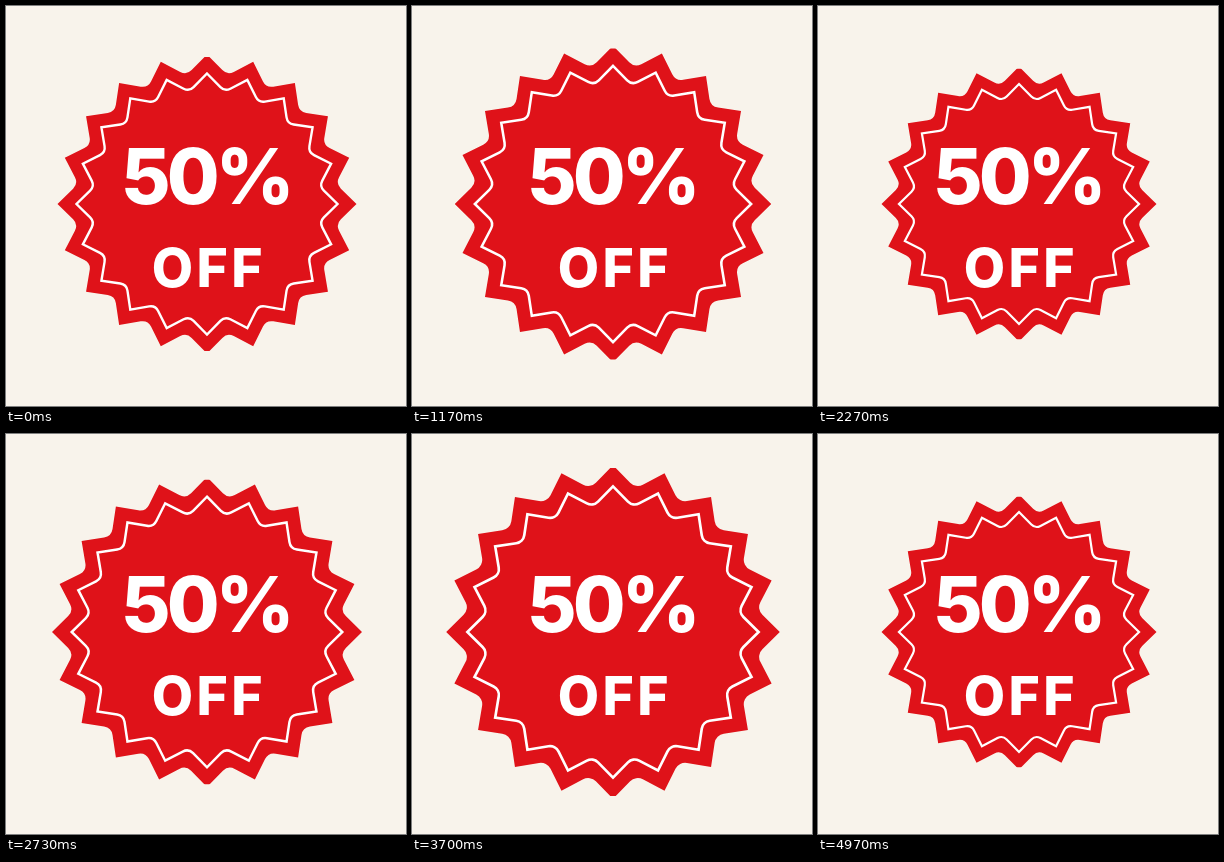
These frames come from a looping animation (400x400 px, 5.01 s). An HTML page with a canvas:

```html
<!DOCTYPE html>
<html lang="en">
<head>
<meta charset="utf-8">
<title>50% OFF</title>
<style>
  html, body { margin: 0; width: 100%; height: 100%; overflow: hidden; background: #f8f3eb; }
  canvas { display: block; width: 400px; height: 400px; }
</style>
</head>
<body>
<canvas id="stage" width="400" height="400"></canvas>
<script>
const ctx = document.getElementById('stage').getContext('2d');
const LOOP = 5010, STEP = 100 / 3, LAST = 149;
const PERIOD = 27;          // steps per pulse
const CX = 201, CY = 198, TEETH = 20;
const BG = '#f8f3eb', RED = '#df1219', WHITE = '#fff';

// Pulse keys: [step, badge radius, slope per step]
const KEYS = [
  [0, 149.5, 5.4], [1, 155, 5.7], [4.5, 171, 0], [9, 153.5, -4.2], [10, 149.5, -3.7],
  [14, 137.5, -2.7], [16, 132.5, -2.1], [19, 129.5, 0], [27, 149.5, 5.4]
];

function radiusAt(step) {
  const p = step % PERIOD;
  const i = KEYS.findIndex(k => k[0] > p);
  const [x0, y0, m0] = KEYS[i - 1], [x1, y1, m1] = KEYS[i];
  const h = x1 - x0, u = (p - x0) / h, v = 1 - u;
  return v * v * ((1 + 2 * u) * y0 + u * h * m0) + u * u * ((1 + 2 * v) * y1 - v * h * m1);
}

const polar = (r, a) => [r * Math.sin(a), -r * Math.cos(a)];

// Pointed tips, rounded valleys
function star(r) {
  const turn = 2 * Math.PI / TEETH;
  ctx.beginPath();
  ctx.moveTo(...polar(r, 0));
  for (let i = 0; i < TEETH; i++) {
    const tip = polar(r, (i + 1) * turn);
    ctx.arcTo(...polar(r * 0.872, (i + 0.5) * turn), ...tip, r * 0.065);
    ctx.lineTo(...tip);
  }
  ctx.closePath();
}

function badge(r) {
  ctx.save();
  ctx.translate(CX, CY);
  ctx.save();
  ctx.beginPath();
  ctx.rect(-200, -r * 0.983, 400, r * 1.966);
  ctx.clip();
  star(r);
  ctx.fillStyle = RED;
  ctx.fill();
  ctx.restore();
  star(r * 0.873);
  ctx.strokeStyle = WHITE;
  ctx.lineWidth = r * 0.016;
  ctx.lineJoin = 'miter';
  ctx.stroke();
  ctx.restore();
}

// Centres the ink of the text on x
function label(text, x, baseline, size, spacing) {
  ctx.font = `800 ${size}px Inter, "Open Sans", sans-serif`;
  ctx.letterSpacing = spacing + 'px';
  ctx.textAlign = 'left';
  ctx.fillStyle = WHITE;
  const m = ctx.measureText(text);
  ctx.fillText(text, x - (m.actualBoundingBoxRight - m.actualBoundingBoxLeft) / 2, baseline);
}

function draw(ms) {
  const step = Math.min(LAST, Math.floor((ms % LOOP + 3.4) / STEP));
  ctx.fillStyle = BG;
  ctx.fillRect(0, 0, 400, 400);
  badge(radiusAt(step));
  label('50%', 200.5, 197.5, 76.5, -4);
  label('OFF', 201.5, 280.5, 53.5, 3.5);
}

const start = performance.now();
function tick() {
  draw(performance.now() - start);
  requestAnimationFrame(tick);
}
tick();
</script>
</body>
</html>
```
